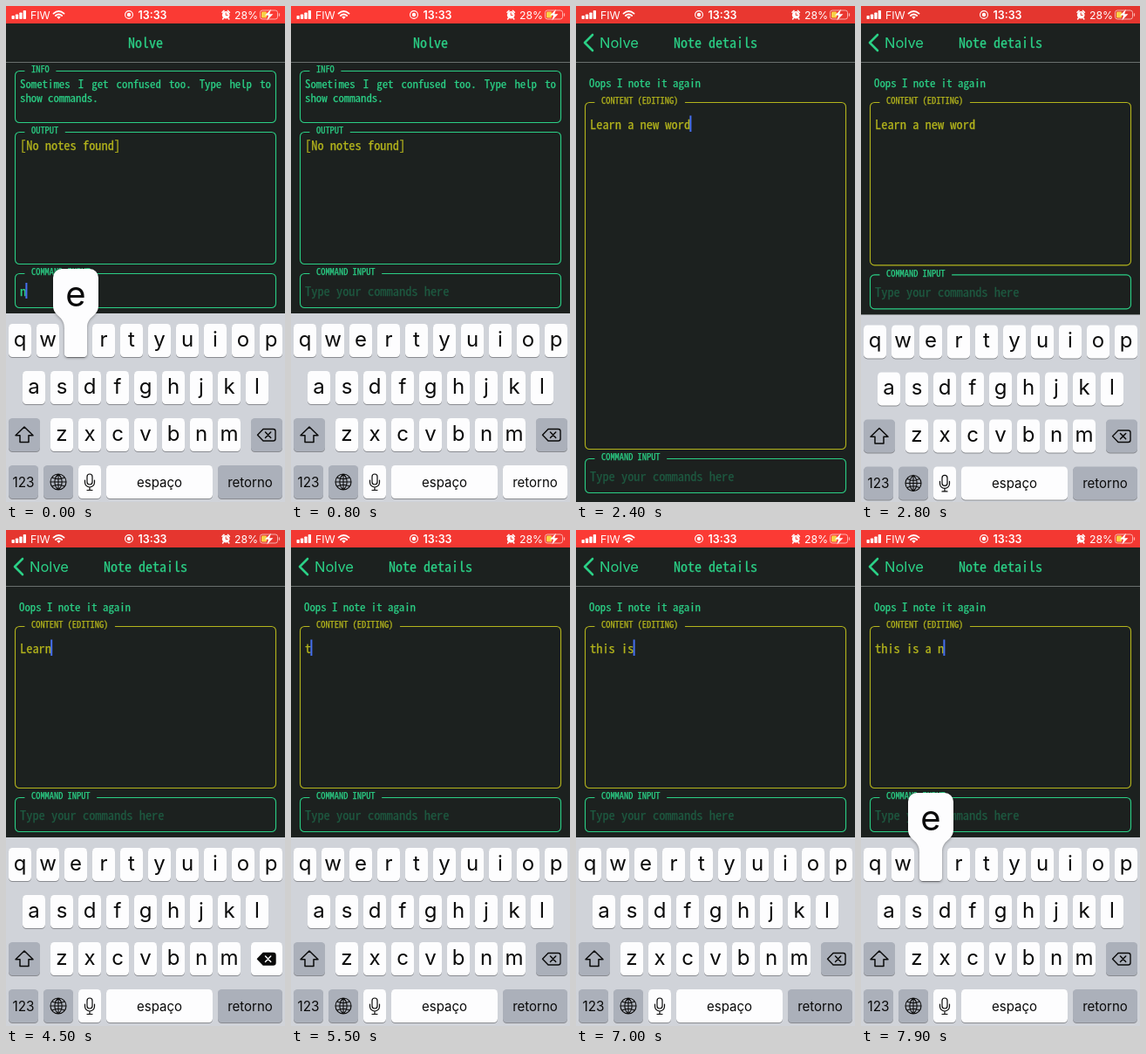
Write an HTML page that moves like this. It is 320x568 px and loops after 8 s.

```html
<!DOCTYPE html>
<html lang="en">
<head>
<meta charset="utf-8">
<title>Notes terminal</title>
<style>
  html, body { margin: 0; width: 100%; height: 100%; overflow: hidden; background: #1c211f; }
  svg { display: block; width: 320px; height: 568px; }
  text { white-space: pre; }
  .mono { font-family: "Noto Sans Mono CJK JP", "Noto Sans Mono", monospace; stroke-width: .25px; }
  .sans { font-family: Inter, "Liberation Sans", sans-serif; }
</style>
</head>
<body>
<svg id="stage" viewBox="0 0 320 568"></svg>
<script>
const LOOP = 8000, STEP = 100;
const BG = '#1c211f', GREEN = '#2bd086', DIM = '#1e5940', YELLOW = '#b4b51c', BLUE = '#456ff0';
const WHITE = '#fdfdfe', GREY = '#abb0ba', INK = '#0a0a0a';
const OPEN = 346, FULL = 558;   // bottom of the input box with and without the keyboard
const NOTE = 'Learn a new word';

// [key, time its letter lands]
const COMMAND = [['e', 90], ['w', 400]];
const TYPED = [['t', 5330], ['h', 5620], ['i', 5900], ['s', 6170], [' ', 6420], ['i', 6680],
  ['s', 6930], [' ', 7150], ['a', 7400], [' ', 7580], ['n', 7760], ['e', 8000]];
const PRESSES = [...COMMAND, ...TYPED];

const stage = document.getElementById('stage');

function add(parent, tag, attrs = {}) {
  const el = document.createElementNS('http://www.w3.org/2000/svg', tag);
  set(el, attrs);
  parent.append(el);
  return el;
}
function set(el, attrs) {
  for (const k in attrs) el.setAttribute(k, attrs[k]);
}
const show = (el, on) => el.setAttribute('visibility', on ? 'inherit' : 'hidden');
const group = parent => add(parent, 'g');
const rect = (p, x, y, width, height, fill, rx = 0) => add(p, 'rect', { x, y, width, height, fill, rx });
const line = (p, d, stroke, width, fill = 'none') =>
  add(p, 'path', { d, stroke, 'stroke-width': width, fill, 'stroke-linejoin': 'round', 'stroke-linecap': 'round' });

// All terminal text advances half an em per letter.
const pen = document.createElement('canvas').getContext('2d');
pen.font = '100px "Noto Sans Mono CJK JP", "Noto Sans Mono", monospace';
const tracking = 0.5 - pen.measureText('0').width / 100;

function mono(p, str, x, y, size, fill) {
  const el = add(p, 'text', { class: 'mono', x, y, fill, stroke: fill, 'font-size': size });
  if (Math.abs(tracking) > .005) el.style.letterSpacing = tracking + 'em';
  el.textContent = str;
  return el;
}
function sans(p, str, x, y, size, fill, anchor = 'start', weight = 400) {
  const el = add(p, 'text', { class: 'sans', x, y, fill, 'font-size': size, 'text-anchor': anchor, 'font-weight': weight });
  el.textContent = str;
  return el;
}

// Rounded frame with its label set into the top edge.
function frame(p, label, color) {
  const path = line(p, '', color, 1.1);
  const text = mono(p, label, 29, 0, 10.4, color);
  const gap = 37 + label.length * 5.2;
  return (top, bottom) => {
    set(path, { d: `M${gap} ${top}H304.5a5 5 0 0 1 5 5V${bottom - 5}a5 5 0 0 1-5 5H15.5a5 5 0 0 1-5-5V${top + 5}a5 5 0 0 1 5-5H21` });
    set(text, { y: top + 1.8 });
  };
}

// Command box that rides on the bottom edge of the layout.
function commandBox(p) {
  const place = frame(p, 'COMMAND INPUT', GREEN);
  const hint = mono(p, 'Type your commands here', 16, 0, 14.4, DIM);
  return { hint, place(b) { place(b - 39.5, b - .5); set(hint, { y: b - 14 }); } };
}

function header() {
  const g = group(stage);
  rect(g, 0, 20, 320, 44, BG);
  rect(g, 0, 64, 320, 1, '#69706d');
  const home = mono(g, 'Nolve', 140, 48, 16, GREEN);
  const back = group(g);
  line(back, 'M19 33L10 42L19 51', GREEN, 2.6);
  sans(back, 'Nolve', 27, 48, 16.5, GREEN);
  const title = mono(g, 'Note details', 112, 48, 16, GREEN);
  return k => {
    set(home, { x: 140 - 112 * k, opacity: Math.max(0, 1 - 1.6 * k) });
    set(back, { transform: `translate(${100 * (1 - k)})`, opacity: Math.max(0, 2 * k - 1) });
    set(title, { x: 112 + 170 * (1 - k), opacity: k });
  };
}

function homeScreen() {
  const g = group(stage);
  frame(g, 'INFO', GREEN)(74.5, 133.5);
  mono(g, 'Sometimes I get confused too. Type help to', 16, 93.5, 12.8, GREEN).style.wordSpacing = 19.2 / 7 + 'px';
  mono(g, 'show commands.', 16, 109.5, 12.8, GREEN);
  const output = frame(g, 'OUTPUT', GREEN);
  mono(g, '[No notes found]', 16, 164.5, 14.4, YELLOW);
  const cmd = commandBox(g);
  const typed = mono(g, '', 16, 332, 14.4, GREEN);
  const caret = rect(g, 0, 317, 2, 18, BLUE);
  return (t, b, k) => {
    set(g, { transform: `translate(${-96 * k})` });
    output(144.5, b - 50.5);
    cmd.place(b);
    const busy = t < 800;
    const str = busy ? 'n' + landed(COMMAND, t) : '';
    typed.textContent = str;
    set(caret, { x: 15.2 + 7.2 * str.length });
    show(caret, busy);
    show(cmd.hint, !busy);
  };
}

function noteScreen() {
  const g = group(stage);
  rect(g, 0, 65, 320, 503, BG);
  mono(g, 'Oops I note it again', 15, 92.5, 12.8, GREEN);
  const content = frame(g, 'CONTENT (EDITING)', YELLOW);
  const text = mono(g, '', 16, 140.5, 14.4, YELLOW);
  const caret = rect(g, 0, 125.5, 2, 18.5, BLUE);
  const cmd = commandBox(g);
  return (t, b, k) => {
    set(g, { transform: `translate(${320 * (1 - k)})` });
    show(g, k > 0);
    content(110.5, b - 50.5);
    cmd.place(b);
    const str = noteText(t);
    text.textContent = str;
    set(caret, { x: 15.2 + 7.2 * str.length });
    show(caret, t >= 2200 && (t < 2700 || t >= 3050));
  };
}

const landed = (list, t) => list.filter(p => p[1] <= t).map(p => p[0]).join('');

// Held delete: one letter, a pause, then ten letters a second.
function noteText(t) {
  if (t < 3080) return NOTE;
  const left = t < 3580 ? 15 : Math.max(0, 15 - Math.floor((t - 3480) / 100));
  return left ? NOTE.slice(0, left) : landed(TYPED, t);
}

function keyboard() {
  const g = group(stage);
  rect(g, 0, 352, 320, 217, '#d0d3d9');
  const spots = {};
  const key = (x, y, w, fill) => {
    rect(g, x, y + 1, w, 38, '#898b90', 4.5);
    return rect(g, x, y, w, 38, fill, 4.5);
  };
  [['qwertyuiop', 3, 364], ['asdfghjkl', 19, 418], ['zxcvbnm', 51, 472]].forEach(([row, x0, y]) =>
    [...row].forEach((c, i) => {
      const x = x0 + 32 * i;
      key(x, y, 26, WHITE);
      sans(g, c, x + 13, y + 26, 24, INK, 'middle');
      spots[c] = { x: x + 13, y };
    }));

  key(3, 472, 36, GREY);
  line(g, 'M21 482L31 491.8H26V499.5H16V491.8H11Z', INK, 1.5);
  const del = key(281, 472, 36, GREY);
  const delBody = line(g, 'M295 484.5H306.5Q309 484.5 309 487V495.5Q309 498 306.5 498H295L288.5 491.2Z', INK, 1.4);
  const delCross = line(g, 'M297.5 488L303.7 494.4M303.7 488L297.5 494.4', INK, 1.5);

  key(3, 526, 34, GREY);
  sans(g, '123', 20, 551, 15.3, INK, 'middle');
  key(43, 526, 34, GREY);
  line(g, 'M51 545a9 9 0 1 0 18 0a9 9 0 1 0-18 0H69M60 536V554M60 536C54.5 541 54.5 549 60 554C65.5 549 65.5 541 60 536M53 540Q60 543.5 67 540M53 550Q60 546.5 67 550', INK, 1.1);
  key(83, 526, 26, WHITE);
  line(g, 'M93 539a3 3 0 0 1 6 0V545a3 3 0 0 1-6 0ZM90.5 543V545.5a5.5 5.5 0 0 0 11 0V543M96 551V554.5M93 554.5H99', INK, 1.2);
  const space = key(115, 526, 122, WHITE);
  sans(g, 'espaço', 176, 550.5, 15, INK, 'middle');
  const enter = key(243, 526, 74, GREY);
  sans(g, 'retorno', 280, 550.5, 15, INK, 'middle');

  const pop = group(g);
  pop.style.filter = 'drop-shadow(0 1px 1.5px rgba(0,0,0,.35))';
  add(pop, 'path', { fill: WHITE, d: 'M-16 0H16a10 10 0 0 1 10 10V42C26 55 13 53 13 68V97a4 4 0 0 1-4 4H-9a4 4 0 0 1-4-4V68C-13 53-26 55-26 42V10a10 10 0 0 1 10-10Z' });
  const big = sans(pop, '', 0, 42.5, 40, INK, 'middle');

  return (t, up) => {
    set(g, { transform: `translate(0 ${217 * (1 - up)})` });
    show(g, up > 0);
    const hit = PRESSES.find(p => t >= p[1] - 110 && t < p[1] + 70);
    const c = hit && hit[0];
    const spot = spots[c];
    show(pop, !!spot);
    if (spot) {
      set(pop, { transform: `translate(${spot.x} ${spot.y - 63})` });
      big.textContent = c;
    }
    const held = t >= 3080 && t < 5050;
    set(del, { fill: held ? WHITE : GREY });
    set(delBody, { fill: held ? INK : 'none' });
    set(delCross, { stroke: held ? WHITE : INK });
    set(space, { fill: c === ' ' ? GREY : WHITE });
    set(enter, { fill: t >= 720 && t < 850 ? WHITE : GREY });
  };
}

function statusBar() {
  const g = group(stage);
  const bar = rect(g, 0, 0, 320, 20, '#f93a34');
  [4, 5.5, 7.5, 10].forEach((h, i) => rect(g, 6.5 + 4.4 * i, 15 - h, 3.3, h, '#fff', .8));
  sans(g, 'FIW', 28, 14.5, 12.3, '#fff');
  line(g, 'M54.5 8.6Q60.5 3.4 66.5 8.6M56.9 11Q60.5 7.8 64.1 11', '#fff', 1.9);
  add(g, 'path', { d: 'M58.2 12.6Q60.5 10.8 62.8 12.6L60.5 15Z', fill: '#fff' });
  add(g, 'circle', { cx: 141, cy: 10, r: 4.4, fill: 'none', stroke: '#fff', 'stroke-width': 1.1 });
  add(g, 'circle', { cx: 141, cy: 10, r: 2.2, fill: '#fff' });
  sans(g, '13:33', 168, 14.5, 12.5, '#fff', 'middle', 600);
  add(g, 'circle', { cx: 252.2, cy: 10.3, r: 4.3, fill: '#fff' });
  line(g, 'M248 7.2L250 5.4M256.4 7.2L254.4 5.4M249.3 14L248.6 15M255.1 14L255.8 15', '#fff', 1.5);
  const hands = line(g, 'M252.2 8V10.6H254.2', '#f93a34', 1);
  sans(g, '28%', 262, 14.5, 12.3, '#fff');
  add(g, 'rect', { x: 291.5, y: 5, width: 20, height: 10, rx: 2.6, fill: 'none', stroke: '#fff', 'stroke-opacity': .6 });
  rect(g, 293, 6.5, 6, 7, '#f8d147', 1.2);
  rect(g, 312.8, 8.2, 1.3, 3.6, '#ffb0aa', .6);
  add(g, 'path', { d: 'M304 3.8L297 10.8H301L299.4 16.4L306.4 9.2H302.2Z', fill: '#fff' });
  return t => {
    const k = .5 + .5 * Math.cos((t - 500) / 6200 * 2 * Math.PI);
    const red = `rgb(${Math.round(224 + 28 * k)},${Math.round(53 + 5 * k)},${Math.round(46 + 6 * k)})`;
    set(bar, { fill: red });
    set(hands, { stroke: red });
  };
}

// Progress from start over dur, fast at first and settling.
function ease(t, start, dur) {
  const p = Math.min(1, Math.max(0, (t - start) / dur));
  return 1 - (1 - p) ** 3;
}

rect(stage, 0, 0, 320, 568, BG);
const drawHome = homeScreen();
const drawNote = noteScreen();
const drawHeader = header();
const drawKeys = keyboard();
const drawStatus = statusBar();

function draw(t) {
  const push = ease(t, 1400, 500);
  const rise = ease(t, 2410, 480);
  const up = t < 2000 ? 1 - ease(t, 900, 350) : rise;
  drawHome(t, OPEN + (FULL - OPEN) * ease(t, 1290, 400), push);
  drawNote(t, FULL - (FULL - OPEN) * rise, push);
  drawHeader(push);
  drawKeys(t, up);
  drawStatus(t);
}

const start = performance.now();
function tick() {
  const t = (performance.now() - start) % LOOP;
  draw(Math.floor(t / STEP) * STEP);
  requestAnimationFrame(tick);
}
tick();
</script>
</body>
</html>
```
